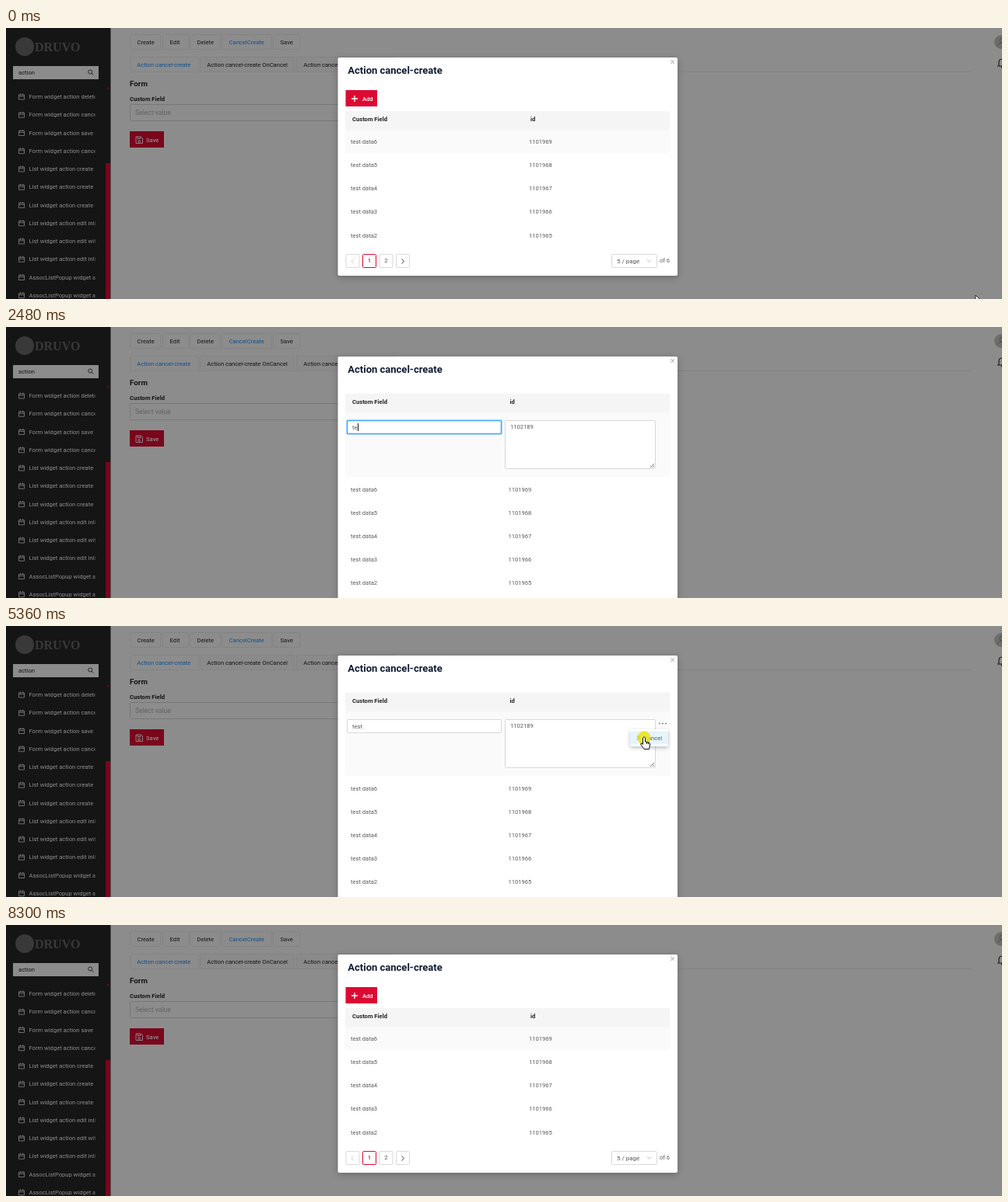
Write an HTML page with a canvas that moves like this. It is 1280 px wide and 349 px high and loops after 8430 ms.

```html
<!DOCTYPE html>
<html lang="en">
<head>
<meta charset="utf-8">
<title>Action cancel-create</title>
<style>
  html, body { margin: 0; width: 100%; height: 100%; overflow: hidden; background: #8c8c8c; }
  canvas { display: block; }
</style>
</head>
<body>
<canvas id="stage" width="1280" height="349"></canvas>
<script>
const ctx = document.getElementById('stage').getContext('2d');
const LOOP = 8430, SIZE = 7.6;
const RED = '#dc0a32', BLUE = '#1890ff', FOCUS = '#40a9ff', GREY = '#d9d9d9', BODY = '#595959', INK = '#222';
const EDIT_START = 1080, EDIT_END = 5760;
const CLICKS = [840, 4150, 5360];

// Pointer path: time, x, y
const PATH = [
  [30, 1246, 344], [300, 700, 160], [430, 480, 54], [510, 440, 78], [590, 463, 84],
  [1300, 463, 84], [1450, 464, 88], [3290, 464, 88], [3620, 801, 144], [3900, 836, 132],
  [4120, 840, 125], [4700, 840, 125], [5030, 820, 143], [5730, 820, 143],
  [6120, 761, 161], [6530, 752, 165], [7330, 752, 165], [7660, 1061, 325]
];
const HIDDEN = [[1610, 3290], [7650, LOOP]];
const TYPED = [2250, 2480, 2680, 2810];
const FIELD_CARET = [[1160, 1680], [2200, 3290], [3810, 4150]];
const PAGE_CARET = [[5800, 6290], [6790, 7320], [7810, 8300]];

const clamp = v => Math.max(0, Math.min(1, v));
const during = (t, spans) => spans.some(([a, b]) => t >= a && t < b);
const inside = (p, x1, y1, x2, y2) => p.x >= x1 && p.x <= x2 && p.y >= y1 && p.y <= y2;

function rect(x1, y1, x2, y2, color) {
  ctx.fillStyle = color;
  ctx.fillRect(x1, y1, x2 - x1, y2 - y1);
}

function frame(x1, y1, x2, y2, color, width = 1) {
  ctx.strokeStyle = color;
  ctx.lineWidth = width;
  ctx.beginPath();
  ctx.roundRect(x1, y1, x2 - x1, y2 - y1, 1);
  ctx.stroke();
}

function card(x1, y1, x2, y2, blur) {
  ctx.save();
  ctx.shadowColor = 'rgba(0,0,0,.25)';
  ctx.shadowBlur = blur;
  ctx.shadowOffsetY = 2;
  ctx.fillStyle = '#fff';
  ctx.beginPath();
  ctx.roundRect(x1, y1, x2 - x1, y2 - y1, 2);
  ctx.fill();
  ctx.restore();
}

function path(d, x, y, color, width = 1, fill) {
  ctx.save();
  ctx.translate(x, y);
  const shape = new Path2D(d);
  if (fill) { ctx.fillStyle = fill; ctx.fill(shape); }
  ctx.strokeStyle = color;
  ctx.lineWidth = width;
  ctx.lineJoin = 'round';
  ctx.stroke(shape);
  ctx.restore();
}

function disc(x, y, r, color) {
  ctx.fillStyle = color;
  ctx.beginPath();
  ctx.arc(x, y, r, 0, 7);
  ctx.fill();
}

// y is the middle of the capital letters
function text(str, x, y, color = INK, weight = 400, size = SIZE, family = 'Roboto, sans-serif') {
  ctx.font = `${weight} ${size}px ${family}`;
  ctx.fillStyle = color;
  ctx.fillText(str, x, y + size * .355);
  return ctx.measureText(str).width;
}

function drawSidebar() {
  rect(0, 0, 134.5, 349, '#272727');
  disc(24, 24, 12, '#686868');
  text('DRUVO', 37, 24, '#686868', 700, 16, '"Liberation Serif", serif');
  rect(9, 49, 119, 66, '#fff');
  text('action', 16, 57.5);
  path('M2.2 0A2.5 2.5 0 1 1 -2.8 0A2.5 2.5 0 1 1 2.2 0M1.6 1.8L4 4.2', 108.5, 56.5, '#333', .9);
  const form = 'Form widget action ', list = 'List widget action ';
  const items = [
    form + 'delete', form + 'cancel', form + 'save', form + 'cancel',
    list + 'create', list + 'create ', list + 'create',
    list + 'edit inline', list + 'edit with', list + 'edit inline',
    'AssocListPopup widget action', 'AssocListPopup widget action'
  ];
  ctx.save();
  ctx.beginPath();
  ctx.rect(0, 70, 114.5, 279);
  ctx.clip();
  items.forEach((label, i) => {
    const y = 88.5 + i * 23.25;
    path('M-3.5 -2.5H3.5V3.5H-3.5ZM-3.5 -.5H3.5M-1.7 -4V-2M1.7 -4V-2', 20, y, '#eee', .8);
    text(label, 29.5, y, '#fff');
  });
  ctx.restore();
  rect(128, 174, 134, 349, RED);
  path('M-1.5 1L0 -1L1.5 1Z', 131, 77, RED, .5, RED);
}

function drawPage() {
  rect(0, 0, 1280, 349, '#fff');
  drawSidebar();
  const buttons = [['Create', 159, 199], ['Edit', 201, 235], ['Delete', 236, 276], ['CancelCreate', 277, 342], ['Save', 343, 378]];
  for (const [label, x1, x2] of buttons) {
    frame(x1 + .5, 8.5, x2 - .5, 27.5, '#ededed');
    text(label, x1 + 9.6, 18.5, label === 'CancelCreate' ? BLUE : INK);
  }
  const tabs = [['Action cancel-create', 159, 248], ['Action cancel-create OnCancel', 249, 371], ['Action cancel-create OnSave', 373, 499]];
  rect(159, 56, 1241, 57, '#ececec');
  tabs.forEach(([label, x1, x2], i) => {
    rect(x1, 37, x2, i ? 56 : 57, i ? '#fafafa' : '#fff');
    frame(x1 + .5, 37.5, x2 - .5, 56.5, '#efefef');
    text(label, x1 + 9.3, 47, i ? INK : BLUE);
  });
  text('Form', 159, 71.5, INK, 700, 9.8);
  text('Custom Field', 159, 91, INK, 700);
  frame(159.5, 98.5, 800, 119.5, GREY);
  text('Select value', 166, 108.5, '#b0b0b0', 400, 8.6);
  rect(159, 133, 203, 154, RED);
  path('M-4 -4H2.5L4.5 -2V4.5H-4ZM-2 -4V-1.5H2V-4M1.5 2A1.4 1.4 0 1 1 -1.3 2A1.4 1.4 0 1 1 1.5 2', 171, 144, '#fff', .9);
  text('Save', 180, 144, '#fff', 500);
  disc(1279, 18, 9, '#c4c8bd');
  path('M-3 0A3 3 0 1 1 3 0A3 3 0 1 1 -3 0M-6 7Q-4 3 0 3', 1280, 16, '#8d9585', 1);
  path('M-7 4H4M-5 4V-1Q-5 -5 0 -5M-2 5Q-1 7 1 6', 1281, 45, '#222', 1.1);
  rect(0, 0, 1280, 349, 'rgba(0,0,0,.45)');
}

function drawDots(y) {
  for (let i = -1; i < 2; i++) disc(844 + i * 4, y, .85, '#555');
}

function drawTable(headY, bodyY, idX) {
  rect(436, headY - 10.5, 853, headY + 14, '#f5f5f5');
  text('Custom Field', 445, headY, INK, 700);
  text('id', idX + 2, headY, INK, 700);
  for (let i = 0; i < 5; i++) {
    text('test data' + (6 - i), 443, bodyY + i * 30.2, BODY);
    text(String(1101969 - i), idX, bodyY + i * 30.2, BODY);
  }
}

function drawList(t, pointer) {
  const shift = t > EDIT_END && t < 6530 ? 1 : 0;
  rect(436.5, 80, 477 + shift, 101, inside(pointer, 436, 80, 477, 101) ? '#e62f50' : RED);
  path('M-4 0H4M0 -4V4', 448 + shift, 91, '#fff', 1.3);
  text('Add', 458 + shift, 91.3, '#fff', 500);
  rect(436, 131.5, 853, 161.3, '#fafafa');
  const row = Math.floor((pointer.y - 131.3) / 30.2);
  if (inside(pointer, 436, 131.5, 853, 282)) {
    rect(436, 131.3 + row * 30.2, 853, 161.5 + row * 30.2, '#fafafa');
    drawDots(147 + row * 30.2);
  }
  drawTable(117.5, 146.2, 672);

  [437, 458.5, 480, 501.5].forEach((x, i) => frame(x, 291.5, x + 17, 308.5, i === 1 ? RED : GREY));
  path('M1.5 -3L-1.5 0L1.5 3', 445.5, 300.5, '#c4c4c4', .9);
  text('1', 464.7, 299.7, RED, 500);
  text('2', 486.3, 299.7, BODY);
  path('M-1.5 -3L1.5 0L-1.5 3', 510, 300.5, '#444', 1);
  frame(778.5, 291.5, 836.5, 308.5, GREY);
  text('5 / page', 785, 300, BODY, 400, 8);
  path('M-2.5 -1.3L0 1.5L2.5 -1.3', 826.5, 299.8, '#bbb', .9);
  text('of 6', 840, 299.7, BODY);
  if (during(t, PAGE_CARET)) rect(840, 294, 841, 304, '#111');
}

function drawEditor(t, pointer) {
  rect(436, 110, 853, 193, '#fafafa');
  drawTable(96.3, 208.9, 645.5);

  rect(438.5, 120.5, 636.5, 137.5, '#fff');
  frame(438.5, 120.5, 636.5, 137.5, GREY);
  const focus = clamp((t - 1110) / 300) * (1 - clamp((t - 4150) / 250));
  ctx.globalAlpha = focus;
  frame(438.5, 120.5, 636.5, 137.5, FOCUS, 1 + focus * .5);
  ctx.globalAlpha = focus * .2;
  frame(437.8, 119.8, 637.2, 138.2, FOCUS, 2);
  ctx.globalAlpha = 1;
  const count = TYPED.filter(at => t >= at).length;
  const width = text('test'.slice(0, count), 445, 129, BODY);
  if (during(t, FIELD_CARET)) rect(Math.round(445 + width), 124, Math.round(446 + width), 134, '#111');

  const hover = inside(pointer, 641, 120, 835, 183) && t > 3290 && t < 4700;
  rect(641.5, 120.5, 834.5, 182.5, '#fff');
  frame(641.5, 120.5, 834.5, 182.5, hover ? FOCUS : GREY);
  text('1102189', 648, 128.3, BODY);
  path('M-5 0L0 -5M-2 0L0 -2', 833, 181, '#555', .8);
  if (t > 3290 && pointer.y > 110) drawDots(125.5);

  if (t >= 4330 && t < 4720) {
    card(741, 133, 850, 212, 5);
    [[144, 783], [165, 850], [183, 850], [200, 808]].forEach(([y, x2]) => rect(741, y, x2, y + 8.5, '#f1f1f1'));
  } else if (t >= 4720) {
    card(802, 133, 851, 155, 5);
    if (inside(pointer, 802, 135, 851, 153)) rect(802, 135.5, 851, 152.5, '#e6f4fb');
    path('M-2 -2.5L2 2.5M2 -2.5L-2 2.5', 813, 144, '#555', .8);
    text('Cancel', 820, 144.2, BODY);
  }
}

function pointerAt(t) {
  const i = PATH.findIndex(p => p[0] > t);
  if (i < 1) {
    const [, x, y] = i ? PATH[PATH.length - 1] : PATH[0];
    return { x, y };
  }
  const [t0, x0, y0] = PATH[i - 1], [t1, x1, y1] = PATH[i];
  const k = (t - t0) / (t1 - t0);
  return { x: x0 + (x1 - x0) * k, y: y0 + (y1 - y0) * k };
}

function drawPointer(t, p, editing) {
  const click = CLICKS.find(at => t >= at && t < at + 210);
  if (click !== undefined) disc(p.x, p.y + 1, 8.5, `rgba(232,228,20,${.85 * (1 - (t - click) / 260)})`);
  if (during(t, HIDDEN)) return;
  const onMenu = t >= 4720 && inside(p, 802, 133, 851, 155);
  const hand = editing ? onMenu || inside(p, 836, 119, 852, 132) : inside(p, 436, 80, 477, 101);
  const beam = editing && (inside(p, 438, 120, 636, 138) || inside(p, 641, 120, 835, 183));
  if (hand) {
    path('M-1.5 1Q0 -1.5 1.5 1V6L6 7Q8 7.5 7.5 10L6.5 15.5H0L-4 10Q-5 8 -3 8L-1.5 9.5ZM3.5 6.5V9M5.5 7V9.3', p.x, p.y, '#111', 1, '#fff');
  } else if (beam) {
    path('M-2.5 -6H-1L0 -5L1 -6H2.5M0 -5V5M-2.5 6H-1L0 5L1 6H2.5', p.x, p.y, '#333', 1);
  } else {
    path('M0 0V11L2.6 8.6L4.4 12.8L6.2 12L4.4 8H8Z', p.x, p.y, '#111', .9, '#fff');
  }
}

function render(t) {
  const editing = t >= EDIT_START && t < EDIT_END;
  const pointer = pointerAt(t);
  drawPage();
  card(426.5, 38, 863, editing ? 380 : 319, 8);
  text('Action cancel-create', 439.3, 54.7, '#111b33', 700, 13);
  path('M-2 -2.3L2 2.3M2 -2.3L-2 2.3', 856.5, 43.5, '#888', .8);
  (editing ? drawEditor : drawList)(t, pointer);
  drawPointer(t, pointer, editing);
}

function tick() {
  render(performance.now() % LOOP);
  requestAnimationFrame(tick);
}
tick();
</script>
</body>
</html>
```
